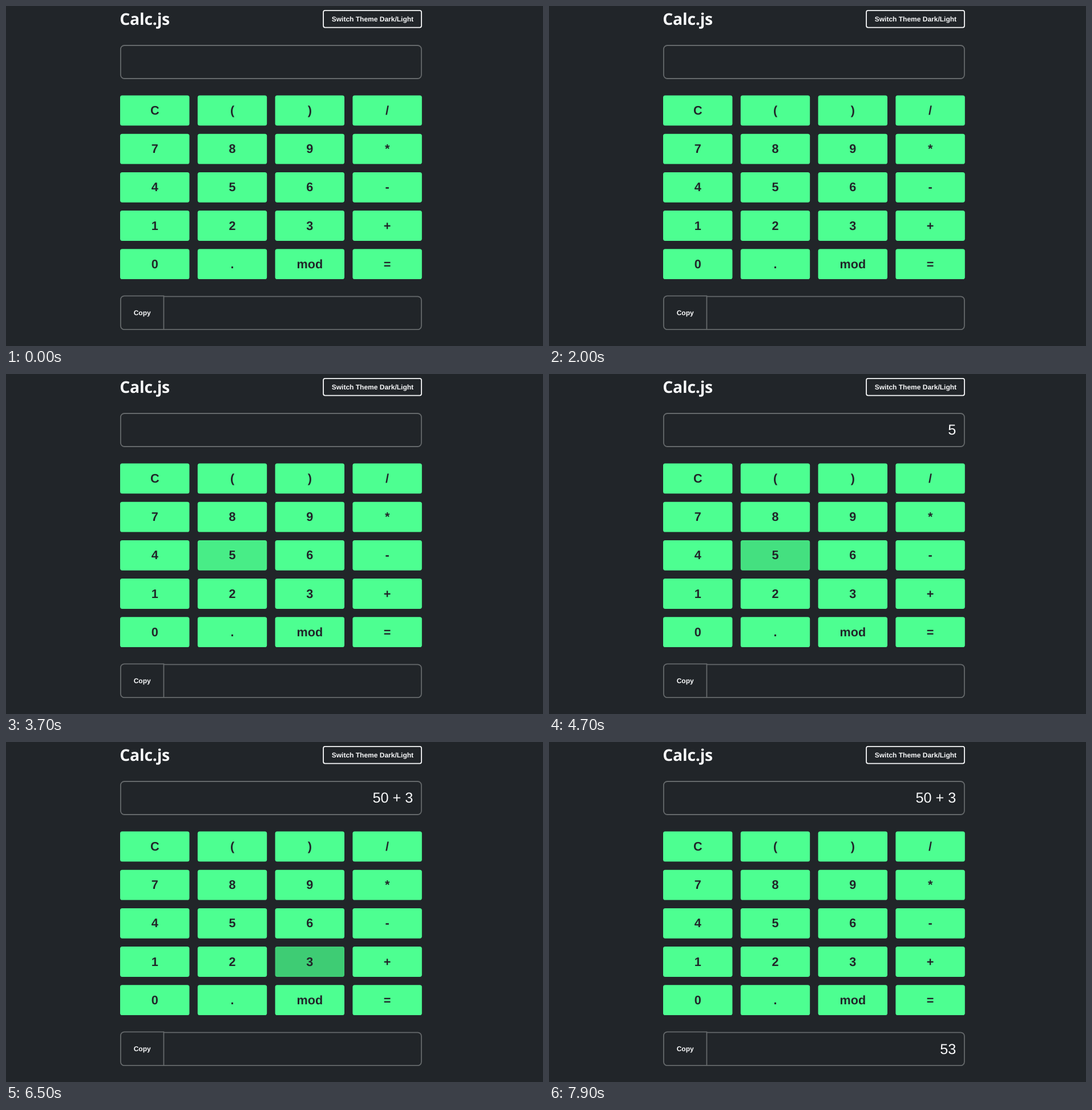
An HTML page that plays this animation: 941x595 px, repeating every 8 s.

```html
<!DOCTYPE html>
<html lang="en">
<head>
<meta charset="utf-8">
<title>Calc.js</title>
<style>
  html, body { margin: 0; width: 100%; height: 100%; overflow: hidden; background: #212529; }
  svg { display: block; width: 941px; height: 595px; font-family: "Liberation Sans", Arial, sans-serif; }
  text { fill: #f8f9fa; white-space: pre; text-rendering: geometricPrecision; }
  .title { font: 700 28.3px "Noto Sans", "Open Sans", sans-serif; letter-spacing: -.2px; }
  .small { font-size: 12px; font-weight: 700; text-anchor: middle; }
  .key text { font-size: 21.6px; font-weight: 700; text-anchor: middle; fill: #212529; }
  .value { font-size: 25.2px; text-anchor: end; }
  .frame { fill: none; stroke: #65696b; stroke-width: 1.8; }
</style>
</head>
<body>
<svg id="stage" viewBox="0 0 941 595">
  <text class="title" x="199.3" y="32.8">Calc.js</text>
  <rect id="themeBox" x="556.1" y="7.8" width="171.9" height="29.8" rx="3" stroke="#f8f9fa" stroke-width="1.8"/>
  <text id="themeText" class="small" x="642.4" y="26.5">Switch Theme Dark/Light</text>

  <rect class="frame" x="200.9" y="69" width="527" height="58" rx="6.5"/>
  <text id="input" class="value" x="713.2" y="106.4"></text>

  <path class="frame" d="M277 508.3H721.4a6.5 6.5 0 0 1 6.5 6.5V559.7a6.5 6.5 0 0 1-6.5 6.5H277"/>
  <path class="frame" d="M207.4 507.3H276.4V566.2H207.4a6.5 6.5 0 0 1-6.5-6.5V513.8a6.5 6.5 0 0 1 6.5-6.5Z"/>
  <text class="small" x="238.7" y="540.7">Copy</text>
  <text id="result" class="value" x="713.2" y="545.7"></text>
</svg>
<script>
const LOOP = 8000, FRAME = 100, FADE = 150;
const DARK = [33, 37, 41], LIGHT = [248, 249, 250];
const GREEN = [77, 255, 145], PRESSED = GREEN.map(v => v * .8);
const labels = 'C ( ) / 7 8 9 * 4 5 6 - 1 2 3 + 0 . mod ='.split(' ');

// Where the unseen pointer goes; times in ms, click is optional
const visits = [
  { on: ')', enter: 1860, leave: 1890 },
  { on: 'theme', enter: 2225, leave: 3335 },
  { on: '5', enter: 3640, leave: 4635, click: 4200 },
  { on: '1', enter: 4680, leave: 5035 },
  { on: '0', enter: 5040, leave: 5450, click: 5300 },
  { on: '3', enter: 5560, leave: 5590 },
  { on: '+', enter: 5570, leave: 6135, click: 6000 },
  { on: '3', enter: 6240, leave: 6535, click: 6500 },
  { on: '=', enter: 6570, leave: 7735, click: 7000 }
];

const byId = id => document.getElementById(id);
const stage = byId('stage');
const themeBox = byId('themeBox'), themeText = byId('themeText');
const input = byId('input'), result = byId('result');

function add(parent, tag, attrs) {
  const el = document.createElementNS('http://www.w3.org/2000/svg', tag);
  for (const name in attrs) el.setAttribute(name, attrs[name]);
  return parent.appendChild(el);
}

const keys = {};
labels.forEach((label, i) => {
  const x = 200 + (i % 4) * 135.8, y = 156.5 + Math.floor(i / 4) * 67.2;
  const g = add(stage, 'g', { class: 'key' });
  keys[label] = add(g, 'rect', { x, y, width: 121.4, height: 52.8, rx: 3.6 });
  add(g, 'text', { x: x + 60.7, y: y + 33.5 }).textContent = label;
});

const mix = (a, b, k) => `rgb(${a.map((v, i) => Math.round(v + (b[i] - v) * k))})`;

function fade(elapsed) {
  const k = Math.min(1, Math.max(0, elapsed / FADE));
  return k * k * (3 - 2 * k);
}

function hoverLevel(name, t) {
  const levels = visits.filter(v => v.on === name)
    .map(v => fade(Math.min(t, v.leave) - v.enter) * (1 - fade(t - v.leave)));
  return Math.max(0, ...levels);
}

function setText(el, text) {
  if (el.textContent !== text) el.textContent = text;
}

function draw(t) {
  const theme = hoverLevel('theme', t);
  themeBox.style.fill = mix(DARK, LIGHT, theme);
  themeText.style.fill = mix(LIGHT, DARK, theme);
  for (const name in keys) keys[name].style.fill = mix(GREEN, PRESSED, hoverLevel(name, t));

  let typed = '', answer = '';
  for (const { on, click } of visits) {
    if (!(t >= click)) continue;
    if (on === '=') answer = typed.split('+').reduce((sum, n) => sum + Number(n), 0);
    else typed += on === '+' ? ' + ' : on;
  }
  setText(input, typed);
  setText(result, String(answer));
}

const begin = performance.now();
function tick() {
  const t = (performance.now() - begin) % LOOP;
  draw(Math.floor(t / FRAME) * FRAME);
  requestAnimationFrame(tick);
}
tick();
</script>
</body>
</html>
```
